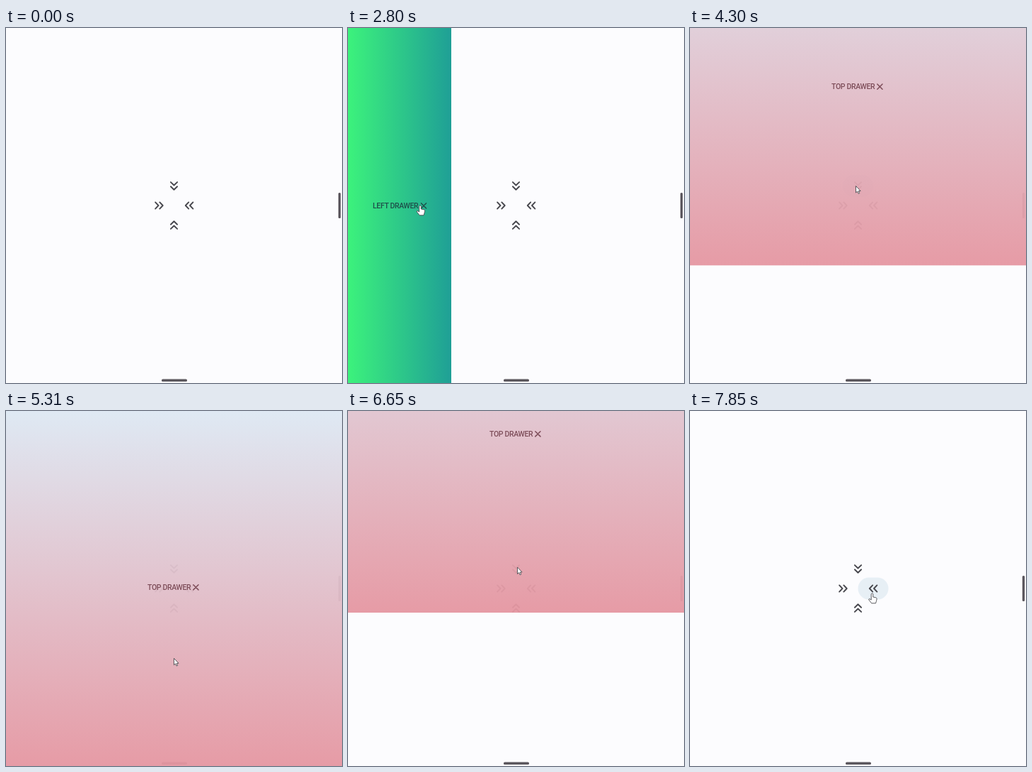
Animation, 475 px wide and 500 px high, one loop 8 s. Source, as an HTML page:

```html
<!DOCTYPE html>
<html lang="en">
<head>
<meta charset="utf-8">
<title>Drawers</title>
<style>
  html, body { margin: 0; width: 100%; height: 100%; overflow: hidden; background: #fcfcfe; }
  svg { display: block; width: 100vw; height: 100vh; }
  text { font: 500 10.5px Roboto, "Open Sans", sans-serif; letter-spacing: -.35px; }
  .line { fill: none; stroke-linecap: round; stroke-linejoin: round; }
</style>
</head>
<body>
<svg viewBox="0 0 475 500">
  <defs>
    <linearGradient id="green">
      <stop stop-color="#3cf27c"/><stop offset="1" stop-color="#1f9f96"/>
    </linearGradient>
    <linearGradient id="pink" x2="0" y2="1">
      <stop stop-color="#dde8f3"/><stop offset="1" stop-color="#e596a1"/>
    </linearGradient>
    <path id="chevrons" d="M-5.4-4.6L-1 0-5.4 4.6M.8-4.6L5.2 0 .8 4.6"/>
    <path id="cross" d="M-3.6-3.6L3.6 3.6M3.6-3.6L-3.6 3.6"/>
    <rect id="pill" x="-21.5" y="-15.5" width="43" height="31" rx="15.5"/>
  </defs>
  <rect width="475" height="500" fill="#fcfcfe"/>
  <g fill="#dce8f2">
    <use id="pillLeft" href="#pill" x="216.5" y="250"/>
    <use id="pillRight" href="#pill" x="259" y="250"/>
    <use id="pillTop" href="#pill" x="237.5" y="222.5"/>
  </g>
  <g class="line" stroke="#47474d" stroke-width="1.9">
    <use href="#chevrons" transform="translate(216.5 250)"/>
    <use href="#chevrons" transform="translate(259 250) rotate(180)"/>
    <use href="#chevrons" transform="translate(237.5 222.5) rotate(90)"/>
    <use href="#chevrons" transform="translate(237.5 277.5) rotate(270)"/>
  </g>
  <g fill="#5c585e">
    <rect x="469.8" y="232" width="3.4" height="36" rx="1.6"/>
    <rect x="220" y="494.6" width="36" height="3.4" rx="1.6"/>
  </g>
  <g id="left">
    <rect width="146" height="500" fill="url(#green)"/>
    <text x="35" y="254" fill="#1e4f4a">LEFT DRAWER</text>
    <use href="#cross" class="line" x="107" y="250.3" stroke="#1e4f4a" stroke-width="1.4"/>
  </g>
  <g id="top">
    <rect width="475" height="500" fill="url(#pink)" fill-opacity=".95"/>
    <text x="200" y="252" fill="#7d4d59">TOP DRAWER</text>
    <use href="#cross" class="line" x="268.4" y="248.3" stroke="#7d4d59" stroke-width="1.5"/>
  </g>
  <g id="cursor">
    <circle id="press" r="9" fill="#e9c56b"/>
    <g fill="#fff" stroke="#4a4a50" stroke-width=".9" stroke-linejoin="round">
      <path id="arrow" d="M0 0V9.5L2.2 7.5 3.6 10.8 5.2 10.1 3.8 7H6.6Z"/>
      <path id="hand" d="M-1.3 1.2a1.3 1.3 0 0 1 2.6 0V5l4 .8q1.3.4 1.3 1.8L6 10.5 5 13.8H-.8L-4.6 9q-.6-1.2.6-1.6L-1.3 9Z"/>
    </g>
  </g>
</svg>
<script>
const LOOP = 8000, WIDTH = 146, HEIGHT = 500;
const DRAG = { start: 5690, end: 6643, lift: 216 };

const $ = id => document.getElementById(id);
const clamp = v => Math.min(1, Math.max(0, v));
const ramp = (t, a, b) => clamp((t - a) / (b - a));
const smooth = k => k * k * (3 - 2 * k);
const fade = (t, from, to) => ramp(t, from, from + 150) - ramp(t, to, to + 150);

// cubic-bezier(.32, .72, 0, 1) over half a second
function glide(t, start) {
  const x = ramp(t, start, start + 500);
  let s = .5;
  for (let step = .25; step > 1e-6; step /= 2)
    s += .96 * (1 - s) ** 2 * s + s ** 3 < x ? step : -step;
  return 2.16 * (1 - s) ** 2 * s + 3 * (1 - s) * s * s + s ** 3;
}

// pointer trips: start, end, and where each one stops
const TRIPS = [
  [90, 820, 216.5, 245.5],
  [1950, 2290, 102, 250],
  [2800, 3320, 215.5, 231],
  [3320, 3590, 234.5, 222.5],
  [4880, 5650, 239.5, 436],
  [DRAG.start, DRAG.end, 239.5, 436 - DRAG.lift],
  [6700, 7140, 250, 82],
  [7140, 7300, 266, 32],
  [7400, 7820, 257.5, 257]
];

function pointer(t) {
  let x = 430, y = 500;
  for (const [start, end, toX, toY] of TRIPS) {
    const k = start === DRAG.start ? pull(t) : smooth(ramp(t, start, end));
    x += (toX - x) * k;
    y += (toY - y) * k;
  }
  return [x, y];
}

const pull = t => ramp(t, DRAG.start, DRAG.end) ** 1.8;
const show = (id, on) => $(id).setAttribute("visibility", on ? "visible" : "hidden");
const alpha = (id, v) => $(id).setAttribute("opacity", v);
const move = (id, x, y) => $(id).setAttribute("transform", `translate(${x} ${y})`);

function draw(t) {
  const leftX = WIDTH * (glide(t, 1350) - glide(t, 2830) - 1);
  const drag = DRAG.lift * pull(t);
  const topY = HEIGHT * (glide(t, 4199) - 1) - drag - (HEIGHT - drag) * glide(t, 7330);
  move("left", leftX, 0);
  move("top", 0, topY);

  $("pillLeft").setAttribute("fill", t < 2700 ? "#dce8f2" : "#ececef");
  alpha("pillLeft", fade(t, 1120, 1960) + fade(t, 3130, 3290));
  alpha("pillTop", fade(t, 4060, 4650));
  alpha("pillRight", .65 * fade(t, 7680, LOOP));

  const [x, y] = pointer(t);
  const over = (cx, cy, w, h) => Math.abs(x - cx) < w && Math.abs(y - cy) < h;
  const onButton = y > topY + HEIGHT &&
    (over(216.5, 250, 21.5, 15.5) || over(259, 250, 21.5, 15.5) || over(237.5, 222.5, 21.5, 15.5));
  const onCross = over(107 + leftX, 250, 8, 8) || over(268.4, 248.3 + topY, 8, 8);
  const hand = onButton || onCross;
  move("cursor", x, y);
  $("cursor").style.display = t < 90 ? "none" : "";
  show("hand", hand);
  show("arrow", !hand);
  show("press", t >= DRAG.start && t < DRAG.end);
}

function tick() {
  draw(performance.now() % LOOP);
  requestAnimationFrame(tick);
}
tick();
</script>
</body>
</html>
```
